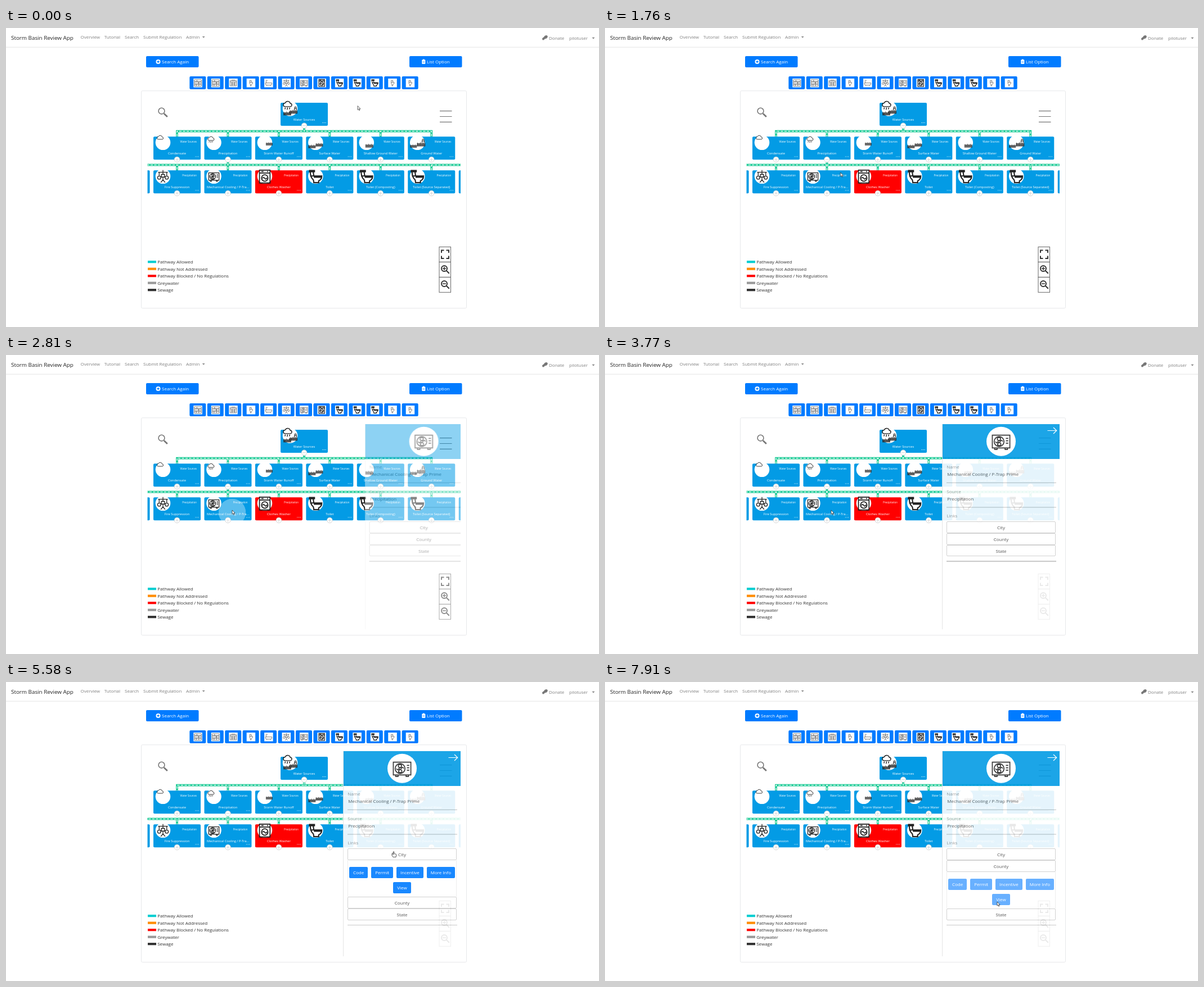
Recreate the animation shown at these times as an HTML page. Size 1054 by 532 pixels, loop 7930 ms.

```html
<!DOCTYPE html>
<html lang="en">
<head>
<meta charset="utf-8">
<title>Permit chart</title>
<style>
  html, body { margin: 0; width: 100%; height: 100%; overflow: hidden; background: #fff; }
  body { position: relative; font: 8px "Open Sans", "Noto Sans", sans-serif; }
  svg { position: absolute; left: 0; top: 0; display: block; }
  text { white-space: pre; }
  .mid { text-anchor: middle; }
  .end { text-anchor: end; }

  .view { position: absolute; left: 251px; top: 123px; width: 557px; height: 365px; overflow: hidden; }
  .panel { position: absolute; left: 349px; top: 0; width: 208px; height: 365px; background: #fff;
    box-shadow: -1px 0 0 #e3e3e3; opacity: 0; animation: open 7.93s infinite; }
  .links { position: absolute; left: 7px; top: 173px; width: 194px; }
  .head { box-sizing: border-box; height: 20.8px; border: 1px solid #ccc; border-radius: 2px; background: #fff;
    color: #444; text-align: center; line-height: 19.5px; }
  .body { overflow: hidden; height: 0; }
  .body div { box-sizing: border-box; height: 65.7px; padding-top: 12px; border: solid #ececec; border-width: 0 1px;
    display: flex; flex-wrap: wrap; justify-content: center; align-content: flex-start; gap: 7.4px 6.2px; }
  .body span { height: 20px; padding: 0 6.9px; border-radius: 2px; background: #007bff; color: #fff; line-height: 20px; }
  .off span { opacity: .65; }
  .rule { height: 1.4px; margin-top: 7.8px; background: #c4c4c4; width: 195px; }
  #city { animation: city 7.93s infinite; }
  #county { animation: county 7.93s infinite; }

  .flow { stroke-dasharray: 4.3 2.2; animation: flow .52867s linear infinite; }
  .ripple { transform-origin: 402px 280px; animation: ripple 7.93s infinite; }
  .cursor { animation: move 7.93s infinite; }
  .arrow { animation: arrow 7.93s step-end infinite; }
  .hand { animation: hand 7.93s step-end infinite; }

  @keyframes flow { to { stroke-dashoffset: -6.5px; } }
  @keyframes open {
    0%, 33.54% { opacity: 0; transform: translateX(78px); animation-timing-function: cubic-bezier(.37, 0, .63, 1); }
    37.33%, 100% { opacity: .9; transform: none; }
  }
  @keyframes ripple {
    0%, 33.53% { opacity: 0; transform: scale(0); }
    33.54% { opacity: .7; transform: scale(0); animation-timing-function: linear; }
    37.33%, 100% { opacity: 0; transform: scale(1); }
  }
  @keyframes city {
    0%, 62.42% { height: 0; animation-timing-function: ease; }
    66.83%, 86.38% { height: 65.7px; animation-timing-function: ease; }
    90.79%, 100% { height: 0; }
  }
  @keyframes county {
    0%, 86.38% { height: 0; animation-timing-function: ease; }
    90.79%, 100% { height: 65.7px; }
  }
  @keyframes move {
    0%, 10.4% { transform: translate(625px, 138.5px); animation-timing-function: ease-in-out; }
    19.9% { transform: translate(428px, 246px); animation-timing-function: ease-out; }
    22%, 23.4% { transform: translate(418.5px, 257px); animation-timing-function: ease-in-out; }
    27%, 48.2% { transform: translate(402px, 276px); animation-timing-function: ease-in; }
    50.7% { transform: translate(626px, 276.5px); animation-timing-function: ease-out; }
    54.5%, 72.5% { transform: translate(689px, 301.5px); animation-timing-function: ease-in; }
    76.3% { transform: translate(704px, 362px); animation-timing-function: ease-out; }
    80%, 100% { transform: translate(697px, 391px); }
  }
  @keyframes arrow { 0%, 100% { opacity: 1; } 53% { opacity: 0; } 88.5% { opacity: 1; } }
  @keyframes hand { 0%, 100% { opacity: 0; } 53% { opacity: 1; } 88.5% { opacity: 0; } }
</style>
</head>
<body>
<svg id="page" width="1054" height="532"></svg>
<div class="view">
  <div class="panel">
    <svg id="form" width="208" height="365" viewBox="600 123 208 365"></svg>
    <div class="links">
      <div class="head">City</div>
      <div class="body" id="city"><div><span>Code</span><span>Permit</span><span>Incentive</span><span>More Info</span><span>View</span></div></div>
      <div class="head">County</div>
      <div class="body" id="county"><div class="off"><span>Code</span><span>Permit</span><span>Incentive</span><span>More Info</span><span>View</span></div></div>
      <div class="head">State</div>
      <div class="rule"></div>
    </div>
  </div>
</div>
<svg width="1054" height="532">
  <g class="cursor">
    <path class="arrow" d="M0 0V7.2L1.7 5.7 2.8 8.2 3.9 7.7 2.8 5.3H5z" fill="#fff" stroke="#222" stroke-width=".7"/>
    <path class="hand" d="M-.8 5.8V.8Q0-.4.8.8V4L4 4.8Q5 5 4.8 6.5L4 10H-1L-3.2 6.8Q-3-.0 -.8 5.8Z" fill="#fff" stroke="#222" stroke-width=".8"/>
  </g>
</svg>

<script>
const BLUE = '#007bff', NODE = '#039be5', RED = '#f00';

const text = (s, x, y, fill, size = 8, cls = '') =>
  `<text class="${cls}" x="${x}" y="${y}" fill="${fill}" font-size="${size}">${s}</text>`;
const rect = (x, y, w, h, fill, rx = 0, more = '') =>
  `<rect x="${x}" y="${y}" width="${w}" height="${h}" rx="${rx}" fill="${fill}" ${more}/>`;
const disc = (x, y, r, fill, more = '') => `<circle cx="${x}" cy="${y}" r="${r}" fill="${fill}" ${more}/>`;
const line = (d, color, width = 1, more = '') =>
  `<path d="${d}" fill="none" stroke="${color}" stroke-width="${width}" ${more}/>`;

// Icon outlines on a 24 unit grid
const ring = (x, y, r) => `M${x - r} ${y}a${r} ${r} 0 1 0 ${2 * r} 0a${r} ${r} 0 1 0 ${-2 * r} 0`;
const cloud = 'M6 15a4 4 0 0 1 .5-8A6 6 0 0 1 18 8a3.5 3.5 0 0 1 0 7z';
const ground = 'M0 14H24M0 17H24M0 20H24M2 11V21M6 12V21M10 10V21M14 12V21M18 10V21M22 12V21';
const art = {
  cloud,
  rain: cloud + 'M7 17l-1 4M12 17l-1 5M17 17l-1 4',
  ground,
  well: ground + 'M14 12L16 1H20L22 12M15 6H21',
  bricks: 'M1 2H23V8H1zM1 9H14V15H1zM15 9H23V15H15zM1 16H23V22H1zM9 2V8M7 16V22M15 16V22',
  wash: 'M2 5H22V21H2zM2 9H22M5 13H19M5 17H19M8 9V21M16 9V21M6 3H18',
  urinal: 'M8 4H13V10H17V14L13 17V21H10V16L8 14zM8 10H13',
  tub: 'M2 12H22V15a4 4 0 0 1-4 4H6a4 4 0 0 1-4-4zM4 12V5a2 2 0 0 1 4 0M6 19v2M18 19v2',
  sprinkler: 'M12 0V8M3 4H21M5 4V10M19 4V10M9 8H15V13H9zM12 13V20M8 23L12 18L16 23' + ring(5, 14, 3) + ring(19, 14, 3),
  cooler: 'M1 4H23V20H1zM4 20V22H7V20M17 20V22H20V20M18 8H21M18 11H21M18 14H21' + ring(9.5, 12, 6.2) + ring(9.5, 12, 1.3)
    + 'M9 11Q6 9 8 7L11 7Q12 9 10 11M10 13Q13 15 11 17L8 17Q7 15 9 13M8.5 12Q6 15 5 12M10.5 12Q13 9 14 12',
  washer: 'M3 1H21V23H3zM3 6H21M6 3.5H10M16 3.5H18' + ring(12, 14.5, 5.5) + 'M8 15Q10 12 12 15T16 14',
  toilet: 'M2 2H10V4H2zM3 4L4 11H9L8 4M4 11L6 15Q9 17 9 22H17V19Q22 17 22 11H9M9 13H21',
};
const icon = (name, x, y, size, width = 1.6, color = '#222') =>
  line(art[name], color, width, `transform="translate(${x} ${y}) scale(${size / 24})"`);

const topBar = () => {
  const grey = '#808080';
  const items = [['Overview', 132.5], ['Tutorial', 174.7], ['Search', 211], ['Submit Regulation', 244], ['Admin', 320]];
  const caret = (x, y) => `<path d="M${x} ${y}h5l-2.5 2.6z" fill="${grey}"/>`;
  return line('M0 34.2H1054', '#e4e4e4') + text('Storm Basin Review App', 9, 21.3, '#222', 9.85)
    + items.map(([s, x]) => text(s, x, 19, grey)).join('') + caret(348.7, 15)
    + '<path d="M953 18.5l3-2.5 2-2.5 3.5-.5 1.5 2.5-2 3-3 .8-2.5 2.2-2-.2z" fill="#777"/>'
    + text('Donate', 965, 20.8, grey) + text('pilotuser', 1001, 20.8, grey) + caret(1041.5, 16.8);
};

const actions = () => rect(249, 50, 93.5, 20, BLUE, 2) + disc(270.5, 60, 4, '#fff')
  + line('M268.2 60h4.6M270.5 57.7v4.6', BLUE, 1.3) + text('Search Again', 277, 62.8, '#fff')
  + rect(717, 50, 93.5, 20, BLUE, 2) + rect(739.3, 56.5, 6, 7.5, '#fff', .8) + rect(741, 55.5, 2.6, 2, '#fff', .6)
  + line('M740.7 59.5h3.2M740.7 61.5h3.2', BLUE, .6) + text('List Option', 748, 62.8, '#fff');

const strip = () => ['bricks', 'bricks', 'wash', 'urinal', 'tub', 'sprinkler', 'cooler', 'washer',
  'toilet', 'toilet', 'toilet', 'urinal', 'urinal'].map((name, i) => {
  const x = 326.3 + 31.45 * i, bold = name === 'toilet' || name === 'washer';
  return rect(x, 86, 29, 23, BLUE, 2) + rect(x + 7, 90, 15.5, 15.5, '#fff')
    + icon(name, x + 8, 91, 13.5, bold ? 2 : 1.3, bold ? '#111' : '#555');
}).join('');

const column = i => 262 + 90.45 * i;
const knob = (x, y, open) => disc(x, y, 4.8, '#fff', 'stroke="#ccc" stroke-width=".8"')
  + line(`M${x - 2.8} ${y}h5.6` + (open ? '' : `M${x} ${y - 2.8}v5.6`), '#ccc', .8);

const node = (x, y, title, group, pic, { fill = NODE, open = false } = {}) =>
  rect(x, y, 84, 41, fill, 2) + disc(x + 17, y + 10.5, 13.3, '#fff') + pic(x, y)
  + text(group, x + 77, y + 10.3, '#fff', 4.4, 'end') + text(title, x + 42, y + 32, '#fff', 5.75, 'mid')
  + [75, 77.6, 80.2].map(d => disc(x + d, y + 35.5, .65, '#d5effb')).join('')
  + knob(x + 42, y + 40.7, open);

const links = (x, y, from, to) => {
  let paths = [];
  for (let i = from; i <= to; i++) paths.push(`M${x} ${y}v9.7H${column(i) + 42}v10`);
  return line(paths.join(''), '#0fc890', 3.8)
    + line(paths.join(''), '#fff', 1.3, 'class="flow"');
};

const chart = () => {
  const pic = (name, dx, dy, size, width = 1.5) => (x, y) => icon(name, x + dx, y + dy, size, width);
  const first = [['Condensate', pic('cloud', 5, -4, 14)], ['Precipitation', pic('rain', 5, -2, 14)],
    ['Storm Water Runoff', pic('ground', 19, 5, 12)],
    ['Surface Water', (x, y) => icon('ground', x + 4, y + 9, 13) + icon('ground', x + 17, y + 6, 13)],
    ['Shallow Ground Water', pic('ground', 15, 7, 14)],
    ['Ground Water', (x, y) => icon('well', x + 16, y + 4, 15) + icon('ground', x + 4, y + 9, 12)]];
  const second = [['Fire Suppression', 'sprinkler'], ['Mechanical Cooling / P-Tra...', 'cooler'],
    ['Clothes Washer', 'washer'], ['Toilet', 'toilet'], ['Toilet (Composting)', 'toilet'], ['Toilet (Source Separated)', 'toilet']];
  const root = (x, y) => icon('rain', x + 3, y - 5, 19, 1.8) + icon('ground', x + 5, y + 10, 14, 1.8) + icon('well', x + 16, y + 7, 14, 1.8);
  const sizes = { toilet: [26, 2], washer: [25, 1.7], cooler: [20, 1.5], sprinkler: [23, 1.4] };
  return '<clipPath id="area"><rect x="251.5" y="123" width="556.5" height="365"/></clipPath>'
    + `<clipPath id="card">${rect(column(1), 253.3, 84, 41, '#000', 2)}</clipPath><g clip-path="url(#area)">`
    + links(530, 174, 0, 5) + links(column(1) + 42, 234, -1, 6)
    + node(488, 133, 'Water Sources', '', root, { open: true })
    + first.map(([s, p], i) => node(column(i), 193.3, s, 'Water Sources', p, { open: i === 1 })).join('')
    + rect(column(-1), 253.3, 84, 41, NODE, 2) + rect(column(6), 253.3, 84, 41, NODE, 2)
    + second.map(([s, name], i) => {
      const [size, width] = sizes[name];
      return node(column(i), 253.3, s, 'Precipitation', pic(name, 17 - size / 2, 11 - size / 2, size, width),
        { fill: i === 2 ? RED : NODE });
    }).join('')
    + `<g clip-path="url(#card)">${disc(402, 280, 48, '#fff', 'class="ripple"')}</g></g>`;
};

const legend = () => [['Pathway Allowed', '#00ced1'], ['Pathway Not Addressed', '#ff8c00'],
  ['Pathway Blocked / No Regulations', RED], ['Greywater', '#999'], ['Sewage', '#333']]
  .map(([s, color], i) => rect(252, 414 + 12.5 * i, 15, 4.2, color) + text(s, 269.2, 419 + 12.5 * i, '#333')).join('');

const tools = () => {
  const dark = '#333';
  const lens = (y, d) => line(ring(779, y - 1, 5) + `M782.8 ${y + 2.8}l5 5`, dark, 2) + line(d, dark, 1.5);
  return [389.5, 416.5, 443.5].map(y => rect(770, y, 20.5, 26.8, '#fff', 0, 'stroke="#666" stroke-width="1"')).join('')
    + line('M774 400v-4.5h4.5M782.5 395.5h4.5v4.5M787 405.5v4.5h-4.5M778.5 410h-4.5v-4.5', dark, 2)
    + lens(429, 'M776 428h6M779 425v6') + lens(456, 'M776 455h6')
    + line(ring(276.5, 147.7, 5.4), '#757575', 1.6) + line('M280.8 152.2l6 5.8', '#757575', 2.6)
    + line('M771 147.7h21.5M771 157.5h21.5M771 167.3h21.5', '#757575', 1.2);
};

const form = () => {
  const field = (y, name, value) => text(name, 607.3, y, '#999') + text(value, 608.3, y + 12.8, '#555')
    + line(`M607 ${y + 25.3}H802`, '#bbb');
  return rect(600, 123, 208, 62, NODE) + disc(704, 153.7, 26, '#fff') + icon('cooler', 687, 137, 34, 1.2)
    + line('M786.5 134.5h16M797 129l5.7 5.5-5.7 5.5', '#fff', 1.2)
    + field(202, 'Name', 'Mechanical Cooling / P-Trap Prime') + field(245.7, 'Source', 'Precipitation')
    + text('Links', 607.3, 289.3, '#999');
};

document.getElementById('page').innerHTML = topBar() + actions() + strip()
  + rect(240.5, 111.8, 578, 386.7, '#fff', 2, 'stroke="#e6e8ea"') + chart() + legend() + tools();
document.getElementById('form').innerHTML = form();
</script>
</body>
</html>
```
